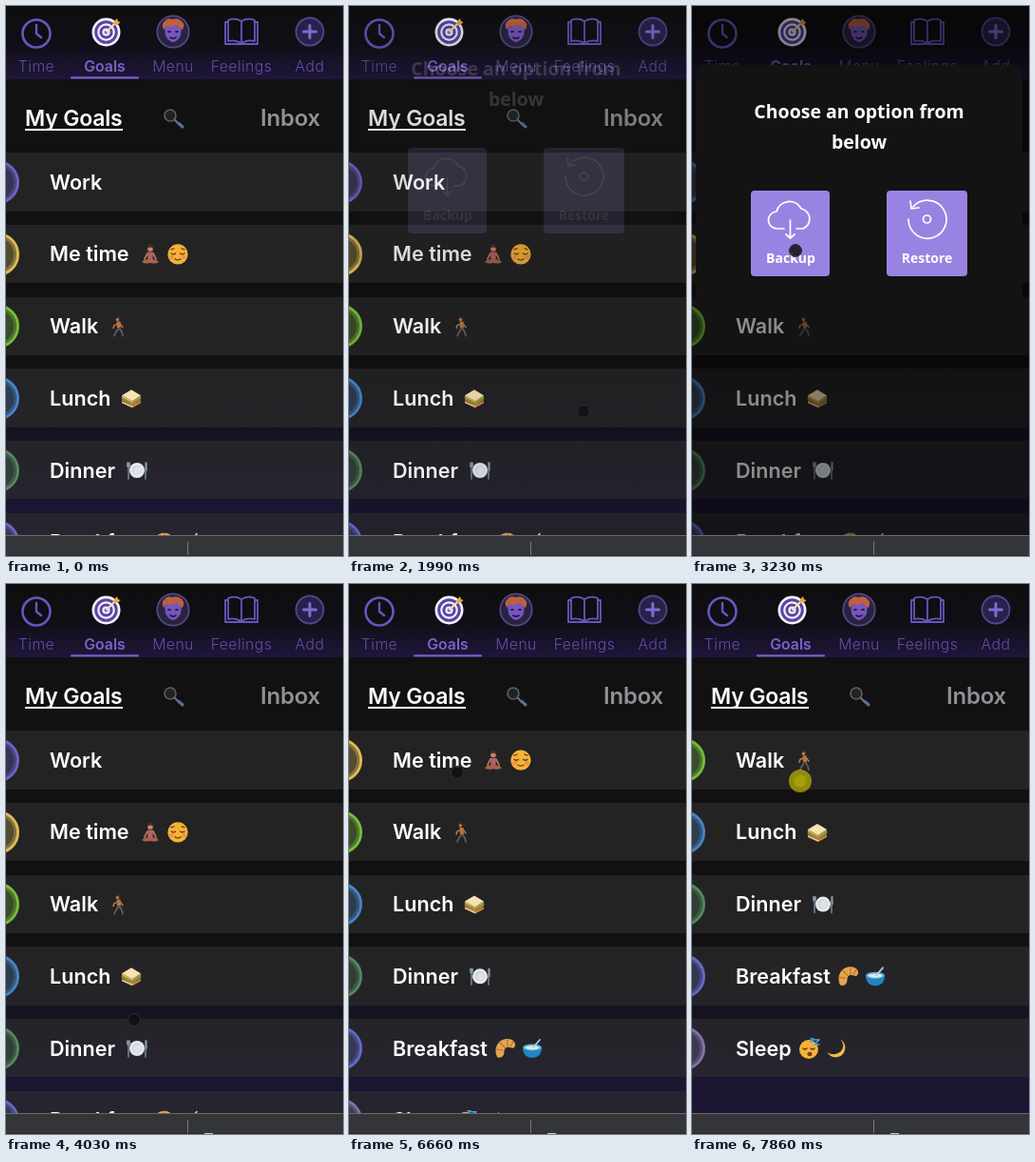
Recreate the animation shown at these times as an HTML page. Size 355 px wide and 578 px high, loop 8 s.

```html
<!DOCTYPE html>
<html lang="en">
<head>
<meta charset="utf-8">
<title>Goals</title>
<style>
  html, body { margin: 0; width: 100%; height: 100%; overflow: hidden; background: #111; }
  svg { display: block; width: 100vw; height: 100vh; font-family: Inter, "Open Sans", sans-serif; }
  .line { fill: none; stroke-linecap: round; stroke-linejoin: round; }
  .tab { font-size: 15.8px; font-weight: 300; letter-spacing: .4px; fill: #604ea6; text-anchor: middle; }
  .active { font-weight: 600; letter-spacing: 0; fill: #7a63c7; }
  .head { font-weight: 600; letter-spacing: -.2px; }
  .goal { font-size: 21.6px; font-weight: 600; fill: #fff; }
  .item { font-size: 16.2px; font-weight: 700; fill: #fff; }
  .dialog { font-family: "Open Sans", "Noto Sans", sans-serif; font-weight: 700; fill: #fff; text-anchor: middle; }
</style>
</head>
<body>
<svg id="stage" viewBox="0 0 355 578" preserveAspectRatio="none"></svg>
<script>
const LOOP = 8000, TICK = 201.5, TOP = 154.2, PITCH = 75.7;

const at = (x, y, body) => `<g transform="translate(${x} ${y})">${body}</g>`;
const dot = (x, y, r, fill, more = '') => `<circle cx="${x}" cy="${y}" r="${r}" fill="${fill}" ${more}/>`;
const ring = (x, y, r, color, w) => dot(x, y, r, 'none', `stroke="${color}" stroke-width="${w}"`);
const box = (x, y, w, h, fill, rx = 0, more = '') =>
  `<rect x="${x}" y="${y}" width="${w}" height="${h}" rx="${rx}" fill="${fill}" ${more}/>`;
const shape = (d, fill) => `<path d="${d}" fill="${fill}"/>`;
const line = (d, color, w = 1.5) => `<path class="line" d="${d}" stroke="${color}" stroke-width="${w}"/>`;
const text = (x, y, s, cls, more = '') => `<text x="${x}" y="${y}" class="${cls}" ${more}>${s}</text>`;

const emoji = {
  calm: dot(0, -6, 2.9, '#c98a62') + shape('M-3 -6Q-3 -10.500 0 -10.500Q3 -10.500 3 -6Q0 -9 -3 -6Z', '#4a2f26')
    + line('M-3 -1L-6 5M3 -1L6 5', '#b9785a', 1.8) + shape('M-3 -2.500H3L2.500 6H-2.500Z', '#b4606a')
    + shape('M-9 8Q-6 4 0 6Q6 4 9 8Q6 10.500 0 9Q-6 10.500 -9 8Z', '#a9634a'),
  relief: dot(0, 0, 10.6, '#f6b236') + dot(-6.5, 3, 2.2, '#ee9250') + dot(6.5, 3, 2.2, '#ee9250')
    + line('M-7 -1Q-5 1 -2.5 -1M2.500 -1Q5 1 7 -1M-3 5Q0 7 3 5M-7 -5L-4 -6M7 -5L4 -6', '#6a4016', 1.3),
  walk: dot(0, -8, 2.5, '#3b2a25') + dot(-.6, -7, 1.7, '#b97b54')
    + line('M1 -3L-4 -1L-5 2M2 -3L5 1', '#b97b54', 1.5) + shape('M-1.500 -5H2.500L3 2H-1Z', '#b5743f')
    + line('M0 3L-2 6L-4 10M2 3L4 6L5 10', '#5f5a60', 1.9),
  sandwich: shape('M-10 -3L0 -9L10 -3L1 3Z', '#f6e3b2') + shape('M-10 -3L1 3V5L-10 -1Z', '#e2b76c') + shape('M10 -3L1 3V5L10 -1Z', '#cf9c52')
    + line('M-9.500 0L1 6L9.500 0', '#7fa03a', 2) + line('M-9.500 2L1 7.500L9.500 2', '#d9743c', 1.2)
    + shape('M-10 3L1 8V10L-10 5Z', '#eac884') + shape('M10 3L1 8V10L10 5Z', '#c99349'),
  plate: dot(0, 0, 8, '#e4e9ee') + dot(0, 0, 5, '#c3cdd7') + dot(.4, .3, 4.2, '#dce3ea')
    + line('M-9 -8V9M-10.2 -8V-4M-7.8 -8V-4M9 -8V9M10 -8V0', '#8797a5', 1.3),
  croissant: shape('M-9 9C-13 0 -8 -10 2 -10C9 -10 12 -4 9 -1C7 1 5 -2 1 -1C-3 0 0 7 -4 9C-6 10 -8 10 -9 9Z', '#e5a550')
    + line('M-10 1L-3 2M-6 -6L-1 -1M2 -9V-2M8 -7L5 -2', '#b87328', 1.2),
  bowl: shape('M-10 -1H10C10 6 6 10 0 10S-10 6 -10 -1Z', '#1f86c4')
    + '<ellipse cy="-1" rx="10" ry="3.6" fill="#47b2e4"/><ellipse cy="-.7" rx="7.6" ry="2.2" fill="#e9e7dc"/>' + line('M1 -1L8 -9', '#b9cbd6', 1.8),
  sleep: dot(-1, 1, 10, '#f6b236') + line('M-7 0Q-5 2 -3 0M1 0Q3 2 5 0', '#5a3416', 1.4)
    + '<ellipse cx="0" cy="6" rx="2.6" ry="2.2" fill="#7a3d18"/>' + line('M5 -9H10L5 -4H10M1 -10H4L1 -7H4', '#4aa7e0', 1.5),
  moon: shape('M4 -9.5A10 10 0 1 1 -9.5 4A10 9 0 0 0 4 -9.5Z', '#f5bd3d')
};

const goals = [
  ['Work', '#6b62c9'], ['Me time', '#dcbc55', ['calm', 152], ['relief', 181]], ['Walk', '#74bd38', ['walk', 118]],
  ['Lunch', '#4683c6', ['sandwich', 132]], ['Dinner', '#55875f', ['plate', 138]],
  ['Breakfast', '#6469c8', ['croissant', 165], ['bowl', 193]], ['Sleep', '#7e75a8', ['sleep', 124], ['moon', 152]]
];

const goalRow = ([name, color, ...marks]) => `<g class="row">`
  + box(0, 0, 355, 61.4, '#2d2d2d', 0, 'fill-opacity=".65" shape-rendering="crispEdges"')
  + dot(-9, 31, 21.5, color, `fill-opacity=".28" stroke="${color}" stroke-width="3"`)
  + `<g opacity=".35">${ring(-9, 31, 18.5, color, 2.5)}</g>`
  + text(46, 38.5, name, 'goal') + marks.map(([k, x]) => at(x, 31, emoji[k])).join('') + '</g>';

const violet = '#6b55bd', indigo = '#5945a5';
const tabs = [
  ['Time', 32, ring(0, 29, 14.5, violet, 2.6) + line('M0 20V29L5 33', violet, 2.4)],
  ['Goals', 104, dot(1.5, 27.5, 15, '#f4f2fa') + ring(1.5, 27.5, 10.8, indigo, 3)
    + ring(1.5, 27.5, 5.6, indigo, 3) + dot(1.5, 27.5, 1.8, indigo)
    + line('M2 27L11 18', '#f6dfae', 2.2) + shape('M9 19L10 16L13 13L14 16L16.500 17L13.500 20Z', '#e8a640')],
  ['Menu', 176, dot(0, 27, 16.7, '#282341', 'stroke="#514881" stroke-width="1.8"')
    + shape('M-9 22Q0 17 9 22L8 31Q5 37 0 38Q-5 37 -8 31Z', '#7855bd')
    + shape('M-10 25Q-13 19 -9 16Q-6 12 -1 14Q6 12 9 16Q13 19 10 25L7 23L4 20L-2 22L-7 21Z', '#bd6040')
    + line('M-5 27H-3M3 27H5M-3 33Q0 35 3 33', '#291e50', 1.8)],
  ['Feelings', 248, line('M0 16Q-7 12 -14 15V37Q-7 35 0 39Q7 35 14 37V15Q7 12 0 16V39M-14 17H-17V40H17V17H14', violet, 1.8)],
  ['Add', 320, dot(0, 27, 14.5, '#28224b', 'stroke="#51458b" stroke-width="1.8"') + line('M-6.500 27H6.500M0 20.500V33.500', '#8069d2', 3)]
];
const header = box(0, 0, 355, 77, 'url(#head)')
  + tabs.map(([name, x, icon]) => at(x, 0, icon) + text(x, 69.3, name, name === 'Goals' ? 'tab active' : 'tab')).join('')
  + box(68, 74.3, 72, 2.2, '#7960c9', 1);

const title = text(20, 126, 'My Goals', 'head', 'font-size="23" fill="#fff"') + box(20, 129, 103, 2, '#fff')
  + dot(173, 115, 6, '#1d2429', 'stroke="#62605d" stroke-width="1.6"') + line('M178 120L181 123', '#77756f', 2)
  + line('M182 123.500L186 127', '#56719c', 3.2)
  + text(268, 126, 'Inbox', 'head', 'font-size="24" fill="#929097"');

// Menu icons are drawn around 0,0.
const menu = [
  ['My Groups', 'M-3 -4A3 3 0 1 0 3 -4A3 3 0 1 0 -3 -4M-6 9V5Q0 -3 6 5V9M-10 -4A2.5 2.5 0 1 1 -5 -6M10 -4A2.5 2.5 0 1 0 5 -6M-11 7V3L-7 0M11 7V3L7 0'],
  ['Blog', 'M-9 -9H9V9H-9ZM-5 -5H2Q5 -5 5 0V5H-5ZM-2 -2H1M-2 2H2'],
  ['Donate', 'M-8 8L-9 3L-2 -7Q3 -11 8 -7Q11 -2 5 1L1 5L-4 9ZM-4 3L2 -2Q6 -3 3 1L-3 4'],
  ['Feedback', 'M0 -12L10 -8V0Q8 8 0 12Q-8 8 -10 0V-8ZM-3 -3A3 3 0 1 0 3 -3A3 3 0 1 0 -3 -3M-5 6Q0 -1 5 6'],
  ['Privacy', 'M-9 -9H9V6H-4L-9 10ZM-5 -4H5M-5 0H5'],
  ['Invest', 'M-4 -8A4 4 0 1 0 4 -8A4 4 0 1 0 -4 -8M0 -9V-7M0 -4V5M0 2Q-5 1 -5 -2M0 2Q5 1 5 -2M-7 6H7V10H-7Z'],
  ['Backup /', 'M-5 7A9 9 0 0 1 -2 -9M-2 -9L-5 -11M-2 -9L-5 -6M5 -7A9 9 0 0 1 2 9M2 9L5 11M2 9L5 6'],
  ['Theme', 'M10 -11L1 -1L-3 2L2 6L5 2L11 -9ZM-3 2Q-8 4 -9 10Q-1 11 2 6']
];
const menuItem = ([name, icon], i) => {
  const y = i < 7 ? 85 + 56 * i : 501, two = i === 6;
  return at(0, y, box(166, -18, 189, two ? 60 : 36, '#151515', 6, 'fill-opacity=".88"')
    + dot(176, 0, 18.8, '#15121e', 'stroke="#5c4e9f" stroke-width="2.5"')
    + ring(176, 0, 16.4, '#392f68', 2)
    + at(176, 0, line(icon, '#6c5bb9', 1.5))
    + text(204, 5.5, name, 'item') + (two ? text(204, 29.5, 'Restore', 'item') : ''));
};

const label = (x, y, s, size) => text(x, y, s, 'dialog', `font-size="${size}"`);
const dialog = box(4, 62, 344, 255, '#131313', 7)
  + label(176, 118, 'Choose an option from', 19.5) + label(176, 150, 'below', 19.5)
  + box(62, 194, 83, 90, '#9983e2', 4) + box(205, 194, 85, 90, '#9983e2', 4)
  + line('M97 234H90A9 9 0 0 1 89 216A14 14 0 0 1 115 213A11 11 0 0 1 117 234H110M103.5 225V244M99 240L103.5 244L108 240', '#fff', 1.7)
  + line('M233 211A20 20 0 1 1 228 224M230 205L231 213L239 212', '#fff', 1.7) + ring(247.5, 224, 4, '#fff', 1.7)
  + label(104, 270, 'Backup', 14) + label(247.5, 270, 'Restore', 14);

const stops = (...list) => list.map(([o, c]) => `<stop offset="${o}" stop-color="${c}"/>`).join('');
const stage = document.getElementById('stage');
stage.innerHTML = `<defs>
  <linearGradient id="head" x2="0" y2="1">${stops([0, '#0e0e0f'], [.5, '#100e15'], [1, '#1f163b'])}</linearGradient>
  <linearGradient id="page" x2="0" y2="1">${stops([0, '#111'], [.64, '#111'], [.9, '#1a1530'], [1, '#1d1535'])}</linearGradient>
  </defs>`
  + box(0, 0, 355, 578, 'url(#page)') + goals.map(goalRow).join('') + title + header
  + `<g id="menu">${box(0, 0, 355, 556, '#555', 0, 'opacity=".4"')}${menu.map(menuItem).join('')}</g>`
  + `<g id="modal">${box(0, 0, 355, 556, '#000', 0, 'opacity=".45"')}<g id="dialog">${dialog}</g></g>`
  + box(0, 556, 355, 22, '#343538') + box(0, 556, 355, 1, '#686d69') + box(191, 563, 1, 15, '#7b7c7d')
  + box(0, 577, 355, 1, '#30282b') + box(209, 577, 9, 1, '#c9c9c9', 0, 'id="mark"')
  + `<g id="cursor">${dot(0, 0, 12, '#e2d600', 'id="press" fill-opacity=".58"')}${dot(0, 0, 6.5, '#111114', 'id="tip" stroke-width="1"')}</g>`;

const $ = id => document.getElementById(id);
const [menuEl, modalEl, dialogEl, markEl, cursorEl, pressEl, tipEl] =
  ['menu', 'modal', 'dialog', 'mark', 'cursor', 'press', 'tip'].map($);
const rows = [...stage.querySelectorAll('.row')];

// Keys are [tick, value, ...]; values run linearly between them.
const pathKeys = [[1, 215, 150], [3, 182, 42], [5, 182, 42], [8, 247, 426], [10, 247, 426], [12, 145, 288], [13, 109, 257],
  [16, 109, 257], [20, 135, 458], [23, 182, 68], [25, 112, 198], [26, 114, 205], [27, 114, 198], [33, 114, 198],
  [34, 114, 207], [35, 114, 198], [38, 114, 198], [39, 114, 207]];
const menuKeys = [[4, 0], [5, 1], [8, 1], [9, .4], [10, 0]];
const modalKeys = [[9, 0], [10, .15], [11, .8], [12, 1], [16, 1], [17, .5], [18, 0]];
const doneKeys = [[27, 0], [29, 1], [34, 1], [36, 2]];
const presses = [4, 8, 15, 26, 34, 39];

function mix(keys, k) {
  const i = keys.findIndex(key => key[0] >= k);
  if (i < 0) return keys[keys.length - 1].slice(1);
  if (i === 0) return keys[0].slice(1);
  const a = keys[i - 1], b = keys[i], f = (k - a[0]) / (b[0] - a[0]);
  return a.slice(1).map((v, j) => v + (b[j + 1] - v) * f);
}

function fade(el, p) {
  el.setAttribute('opacity', p);
  el.setAttribute('display', p > 0 ? 'inline' : 'none');
}

function draw(ms) {
  const k = Math.floor((ms + 35) / TICK);
  const [done] = mix(doneKeys, k), [open] = mix(modalKeys, k), [x, y] = mix(pathKeys, k);
  rows.forEach((row, i) => {
    row.setAttribute('transform', `translate(0 ${TOP + Math.max(0, i - done) * PITCH})`);
    fade(row, Math.max(0, Math.min(1, 1 + i - done)));
  });
  fade(menuEl, mix(menuKeys, k)[0]);
  fade(modalEl, open);
  dialogEl.setAttribute('transform', `translate(0 ${-53 * (1 - open)})`);
  fade(markEl, k >= 18 ? 1 : 0);
  fade(cursorEl, k >= 1 ? 1 : 0);
  cursorEl.setAttribute('transform', `translate(${x} ${y})`);
  const down = presses.includes(k);
  fade(pressEl, down ? 1 : 0);
  tipEl.setAttribute('fill', down ? '#d0c000' : '#111114');
  tipEl.setAttribute('fill-opacity', down ? .35 : .85);
  tipEl.setAttribute('stroke', down ? 'none' : '#302f35');
}

const start = performance.now();
function loop(now) {
  draw(Math.max(0, now - start) % LOOP);
  requestAnimationFrame(loop);
}
draw(0);
requestAnimationFrame(loop);
</script>
</body>
</html>
```
